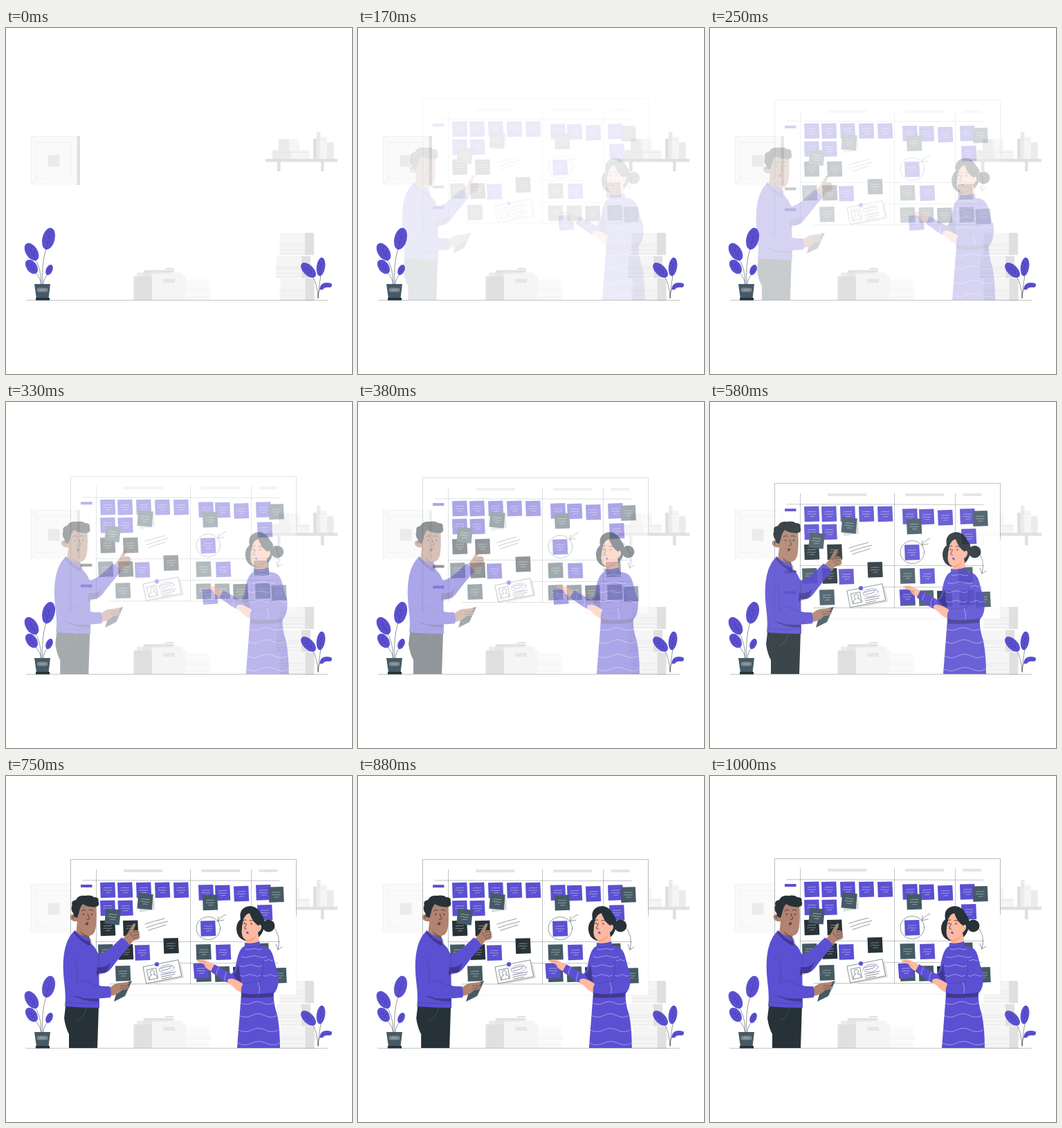
Recreate the animation shown at these times as an HTML page. Size 500 by 500 pixels, loop 1040 ms.

```html
<!DOCTYPE html>
<html>
<head>
<meta charset="utf-8">
<style>
html, body { margin: 0; width: 100%; height: 100%; overflow: hidden; background: #fff; }
svg { display: block; width: 100vw; height: 100vh; }
.line { fill: none; stroke: #263238; stroke-width: .5; stroke-linecap: round; stroke-linejoin: round; }
.wave { fill: none; stroke: #fff; stroke-width: .6; opacity: .7; }
.p { fill: #5b50d2; }
.d { fill: #263238; }
.g { fill: #455a64; }
.brown { fill: #b18370; }
.peach { fill: #ffb99f; }
.shade { fill: #000; opacity: .3; }
</style>
</head>
<body>
<svg viewBox="0 0 500 500">
  <!-- room -->
  <g id="room">
    <path fill="#fafafa" d="M36 156h66v71h-66z"/>
    <path fill="#e0e0e0" d="M102.500 156h4.500v71h-4.500z"/>
    <path fill="none" stroke="#ebebeb" stroke-width=".6" d="M36 156.4H103M36 156L44 165.5V217.500L36 227M102 156L94 165.500V217.500L102 227M44 165.500H94M44 217.500H64M36 156V227"/>
    <path fill="#ebebeb" d="M60.500 183.500h17v17h-17z"/>

    <path fill="#e0e0e0" d="M375 189h104v4.500h-104zM392 193h4.500v14h-4.500zM455 193h4.500v14h-4.500zM444 160h5.500v29h-5.500z"/>
    <path fill="#ebebeb" d="M385 176.500h27v12.500h-27zM394 160.500h15v16h-15zM449 150h5.500v39h-5.500zM463.500 165h10v24h-10z"/>
    <path fill="#f5f5f5" d="M412 176.500h27v12.500h-27zM409 160.500h15v16h-15zM454.500 157h9v32h-9z"/>
    <path fill="none" stroke="#e0e0e0" stroke-width=".6" d="M386 179.500H438M449 159h5.500M455 162h8"/>

    <path fill="#e0e0e0" d="M184.500 359h27v34h-27zM199 350h44v5h-44zM229 348q4-2 13-1v2h-13z"/>
    <path fill="#ebebeb" d="M189 353.500h12v5.500h-12z"/>
    <path fill="#f5f5f5" d="M211 359h49v34h-49zM211 353.500q20-3 44 .5l1 5h-45z"/>
    <path fill="#e6e6e6" d="M227.500 362.500h16.500v5.500h-16.500zM198 353l40-1 3 2-30 1-1 4h-12z"/>
    <path fill="#fafafa" d="M260 363h34v30h-34z"/>
    <path fill="none" stroke="#ebebeb" stroke-width=".6" d="M260 377h35M260 380.500h37M262 388.500h32"/>
    <g id="stacks"></g>
  </g>

  <!-- board -->
  <g id="board">
    <path fill="#fff" d="M93.500 119.500H419.500V315.500H93.500z"/>
    <path fill="none" stroke="#ececec" stroke-width=".6" d="M419.500 200V315.500H93.500"/>
    <path class="line" style="opacity:.65" d="M93.500 315.500V119.500H419.500V200"/>
    <path class="line" style="stroke-width:.45;opacity:.65" d="M111 149.700L395 150.300M130 238.400H395M248 269.400H393M150 299.500H393M130.500 134V299M266.500 134V299M354.500 134V299"/>
    <path fill="#e4e4e4" d="M170 134h56.500v4h-56.500zM282 134h56.500v4h-56.500zM365.500 134h27v4h-27z"/>
    <path class="p" d="M108 156h16.500v4h-16.500zM108 275.500h16.500v4h-16.500z"/>
    <path class="d" d="M108 245.500h16.500v4h-16.500z"/>
    <g id="notes"></g>
    <path class="line" d="M201 213q15-5 28-8M203 218q13-5 31-9M206 222q12-4 25-8"/>
    <ellipse class="line" cx="292.300" cy="219" rx="17.300" ry="16.500"/>
    <path class="line" d="M318 199Q310 202 307 208M307 202L306 209L315 207M384 214Q399 230 393 250M390 242L393 250L399 246"/>
    <g transform="translate(225.800 281.800) rotate(-11.300)">
      <path fill="#e2e2e2" d="M-24-9H29V15H-24z"/>
      <path fill="#fff" stroke="#263238" stroke-width=".5" d="M-26-12.300H26V12.300H-26z"/>
      <path class="line" d="M-21-7H-8V8H-21zM-20 7q0-5 4-5q-3-7 2-7q5 1 1 7q4 0 4 5M-3 4H19M-3 7H17M-3 10H12M-2-5q7-2 17 0M-1-2q9 1 14-1"/>
      <ellipse class="line" cx="7" cy="-3" rx="11" ry="5.500" style="stroke:#5b50d2"/>
    </g>
    <circle class="p" cx="218" cy="271" r="3.100"/>
  </g>

  <!-- man -->
  <g id="man">
    <path class="d" d="M85 333L83 350Q85 364 90 373V393H131L133 331z"/>
    <path class="line" style="stroke:#55666e" d="M101 353Q112 349 115 336"/>
    <path class="brown" d="M103 186Q114 178 129 186Q130.500 203 129 216Q128 230 119 231L120 238L119 245L100 228L102 210Q93 211 91.500 204Q92 199 99 200z"/>
    <path class="shade" d="M106 223Q111 230 119 231L120 235Q109 233 106 223z"/>
    <path class="d" d="M97 203Q97 198 94.500 196Q92.500 190 94.500 187Q92.500 180 100 179Q104 171.500 113 173Q122 171.500 126 175Q134 175 132.500 181Q135.500 189 126 189.500Q116 189 110 185Q106 189 104.500 197L102 205z"/>
    <path class="line" d="M108 195q3-3 6-1M119 194q4-2 6 1M117 199q1 4 3 7q-1 2-4 1.500M96 202q-2 2 0 4" style="stroke-width:.8"/>
    <circle class="d" cx="111" cy="200" r="1"/><circle class="d" cx="123" cy="200" r="1"/>
    <path class="line" style="fill:#8b3f3b" d="M114.500 212.500q2-2 3.500 0q-1 4-3.500 2.500z"/>

    <path class="p" d="M98 223Q107 232 120 234L121 242Q131 248 133 263L134 335Q108 335 84 333Q86 320 83 297Q78 254 91 232z"/>
    <path class="shade" d="M119 239L121 234L124 244L118 245Q105 237 98 228L98 223Q108 237 119 239z"/>
    <path class="shade" d="M90 314Q104 323 133 318V326Q111 327 90 314zM130 270L138 286L130 288z"/>
    <path class="p" d="M120 242Q127 248 133 258Q143 255 152 247L166 233.500Q174 237 178 245Q166 258 151 278Q142 289 130 283z"/>
    <path class="shade" d="M131 276Q145 278 151 268L145 282Q137 288 130 284z"/>
    <path class="brown" d="M168 235L175 227L182 214.500Q185 211.500 186.500 214.500L182.500 224Q187 221.500 190 224Q193 226 191.500 229Q194 233 190 236Q185 237 182 238.500L178 245Q174 238 168 235z"/>
    <path class="line" d="M182 226L190 225M183 230L191 229M184 235l5-3M178 226q2 6 6 7"/>
    <path class="g" d="M162 301L181 296L171 318L155 326z"/>
    <path class="brown" d="M149 306Q157 299 163 299L175 298Q180 300 173 303L178 305Q176 309 167 309Q160 317 149 318z"/>
    <path class="line" d="M164 303l9 0M164 307l10-1"/>
    <path class="p" d="M99 263Q105 281 103 297Q110 294 116 297Q132 305 149 304Q152 312 150 320Q125 323 109 321Q92 313 90 298z"/>
    <path class="line" style="opacity:.5" d="M99 264Q104 281 101 300Q107 294 116 297Q124 302 136 304M84 327Q109 330 134 328M133 256V272"/>
  </g>

  <!-- woman -->
  <g id="woman">
    <path class="d" d="M340 207Q337 192 350 188.500Q363 186 370 200Q377 208 374 218Q372 230 362 236L346 238Q334.500 234 334 221Q334 212 340 207z"/>
    <circle class="d" cx="380.500" cy="216.500" r="9"/>
    <path class="peach" d="M343 207Q347 199 354 198Q359 209 366 215Q371 214 370 220Q368 225 365 226L368 243H346L350 237.500Q342.500 237 341.500 226z"/>
    <path class="d" d="M340 210Q343 196 353 194Q348 200 344.500 206L342 217zM352 195Q356 210 366 216.500L371 210L368 199z"/>
    <path class="line" style="stroke-width:.8" d="M344 209q2-2 4-1M353 209q3-2 6 1M348.500 213q-1 4-3 7q1 2 3 1"/>
    <circle class="d" cx="345.500" cy="213" r="1"/><circle class="d" cx="355.500" cy="213.500" r="1"/>
    <path class="p" d="M347.500 226.500q2.500-3 3.500-1q1.500 2 0 3z"/>
    <path fill="#ff9d86" d="M350 237.500Q358 235 363 230Q360 239 349 240z"/>

    <g id="held" transform="translate(272 270)"></g>
    <path class="p" d="M346 241Q357 243 367 239L369 246Q383 245 387 260L393 283Q396 300 388 315Q387 328 393 345Q397 366 397 393H335L341 315Q339 308 339 300Q327 303 314 295L296 282L302 272L327 286Q332 282 334 269Q338 248 346 246z"/>
    <path class="peach" d="M278 266Q285 264 291 267L302 272.500L297 282Q289 278 287 272L278 268.500Q275 267.500 278 266z"/>
    <path class="line" style="stroke:#c77966" d="M280 267l9 2M287 272l5 2"/>
    <path class="shade" d="M342 313Q357 319 388 312L386 319Q360 322 341 320zM329 287Q335 283 337 270L341 299Q335 296 329 287z"/>
    <path class="peach" d="M321 296Q322 292 329 293Q338 296 344 301L341 313Q332 309 328 303L322 299z"/>
    <path class="p" d="M368 265L394 282Q397 304 389 313Q370 317 341 313Q340 305 344 300L368 297Q374 285 368 265z"/>
    <path class="line" style="opacity:.5" d="M372 267Q374 285 369 297L344 300M345 246Q358 249 369 245M342 315Q362 317 388 313"/>
    <g id="waves"></g>
  </g>

  <!-- plants and floor -->
  <g>
    <path class="line" d="M53 371Q51 340 58 319M51 371Q51 345 41 333M51 371Q50 362 43 354M53 371Q55 362 60 355M451 390Q452 373 455 357M451 390Q450 370 443 359M451 390Q451 379 455 376"/>
    <g id="leaves"></g>
    <path class="p" d="M453 377Q455 365 470 369Q473 373 468 375Q460 374 458 378Q454 379 453 377z"/>
    <path class="line" style="opacity:.4" d="M454 377Q459 371 469 372"/>
    <path class="g" d="M41 370H64L61.500 391H44z"/>
    <path class="d" d="M43 390h20v3.500h-20z"/>
    <rect x="45" y="376" width="15" height="5" rx="2.500" fill="#6f7f87" stroke="#b6bec2" stroke-width=".5"/>
    <path stroke="#dde1e3" stroke-width=".6" d="M48 378.500h9"/>
    <path class="line" style="opacity:.6" d="M29 393.400H465"/>
  </g>
</svg>
<script>
const el = id => document.getElementById(id);
const fill = (id, parts) => { el(id).innerHTML = parts.join(''); };

const note = (color, x, y, turn = 0) =>
  `<g transform="translate(${x} ${y}) rotate(${turn} 11 11)">` +
  `<path class="${color}" d="M0 .6L21.300 0L22.300 22L.8 22.700z"/>` +
  '<path class="wave" d="M5 8.500q3-1 6-.5t6-.5M4.500 12q3-1 6.500-.3t6-.5M8 15.500q3-1 7-.4"/></g>';

const shadow = (x, y) => `<path fill="#ddd" d="M${x} ${y}l23-1 1 22-22 4z"/>`;

fill('notes', [
  ...[136, 161, 188, 215, 242].map(x => note('p', x, 152.500)),
  note('p', 136, 178.500), note('p', 161.500, 178.500),
  shadow(191, 171), note('g', 190, 169, 7),
  note('d', 136, 207.500), note('g', 143, 191, 8), note('d', 169, 207.500),
  note('g', 133, 242), note('d', 162, 242), note('p', 186, 243),
  note('d', 227.500, 233), note('g', 158, 273),
  note('p', 278, 156), note('p', 302, 156.500), note('p', 329, 157.800),
  note('g', 284, 170.500), note('p', 281, 208),
  note('g', 274.500, 242), note('p', 303, 242.300),
  note('g', 274.500, 274), note('g', 301.500, 274), note('d', 328, 274.500),
  note('p', 361, 156), note('g', 379.500, 159), note('p', 363, 185),
  note('g', 358, 240.500), note('g', 360, 273.500), note('g', 383.500, 276)
]);
fill('held', [note('p', 0, 0, -2)]);

const wave = (x, y, w, a) =>
  `<path class="wave" d="M${x} ${y}q${w / 6} ${a} ${w / 3} 0t${w / 3} 0t${w / 3} 0"/>`;
fill('waves', [
  wave(347, 250, 24, 2), wave(341, 261, 37, 3), wave(338, 274, 33, 3),
  wave(339, 288, 30, 3), wave(374, 266, 13, 2), wave(373, 288, 20, 3),
  wave(340, 328, 48, 4), wave(338, 346, 55, 5), wave(337, 367, 58, 5), wave(336, 386, 61, 5),
  '<path class="wave" d="M309 276q-4 5-4 11M320 283q-4 6-3 13M365 298q4 8 2 16"/>'
]);

const stack = (x, y) => {
  let s = `<path fill="#f5f5f5" d="M${x} ${y}h37v32h-37z"/>` +
    `<path fill="#e0e0e0" d="M${x + 36} ${y}h13v32h-13zM${x + 48} ${y + 12}l2 1-2 5z"/>`;
  for (const dy of [16, 19, 25, 30])
    s += `<path stroke="#e3e3e3" stroke-width=".7" d="M${x - 2} ${y + dy}h38"/>`;
  return s;
};
fill('stacks', [stack(396, 296), stack(391, 329.500), stack(396.500, 362)]);

const leaf = (x, y, rx, ry, turn) =>
  `<g transform="translate(${x} ${y}) rotate(${turn})"><ellipse class="p" rx="${rx}" ry="${ry}"/>` +
  `<path class="line" style="opacity:.4" d="M0 ${ry}V${-ry * .75}M0 ${ry * .4}L${rx * .6} 0M0 ${ry * .4}L${-rx * .6} 0` +
  `M0 ${-ry * .1}L${rx * .6} ${-ry * .5}M0 ${-ry * .1}L${-rx * .6} ${-ry * .5}"/></g>`;
fill('leaves', [
  leaf(61.500, 304.500, 9, 16, 14), leaf(37, 323.500, 8.500, 14, -32),
  leaf(37, 345, 7.500, 11.500, -36), leaf(62.500, 349.500, 4.700, 8, 24),
  leaf(455, 345, 6.200, 13.500, 8), leaf(437, 350, 7.500, 13.500, -45)
]);

// cubic bezier (.36, -.01, .5, 1.38)
const bez = (a, b, s) => 3 * (1 - s) ** 2 * s * a + 3 * (1 - s) * s * s * b + s ** 3;
function ease(x) {
  if (x <= 0) return 0;
  if (x >= 1) return 1;
  let lo = 0, hi = 1;
  for (let i = 0; i < 24; i++) {
    const mid = (lo + hi) / 2;
    if (bez(.36, .5, mid) < x) lo = mid; else hi = mid;
  }
  return bez(-.01, 1.38, lo);
}

const LOOP = 1040, FPS = 24, TRAVEL = 20;

function place(id, dx, dy, alpha) {
  el(id).setAttribute('transform', `translate(${dx} ${dy})`);
  el(id).setAttribute('opacity', alpha);
}

function draw(now) {
  const step = Math.floor(((now % LOOP) + 4) * FPS / 1000);
  const e = step < 1 ? 0 : ease(step / FPS + .01);
  const off = TRAVEL * (1 - e), alpha = Math.max(0, Math.min(1, e));
  place('board', 0, -off, alpha);
  place('man', -off, 0, alpha);
  place('woman', off, 0, alpha);
}

const start = performance.now();
function tick() {
  draw(performance.now() - start);
  requestAnimationFrame(tick);
}
draw(0);
requestAnimationFrame(tick);
</script>
</body>
</html>
```
